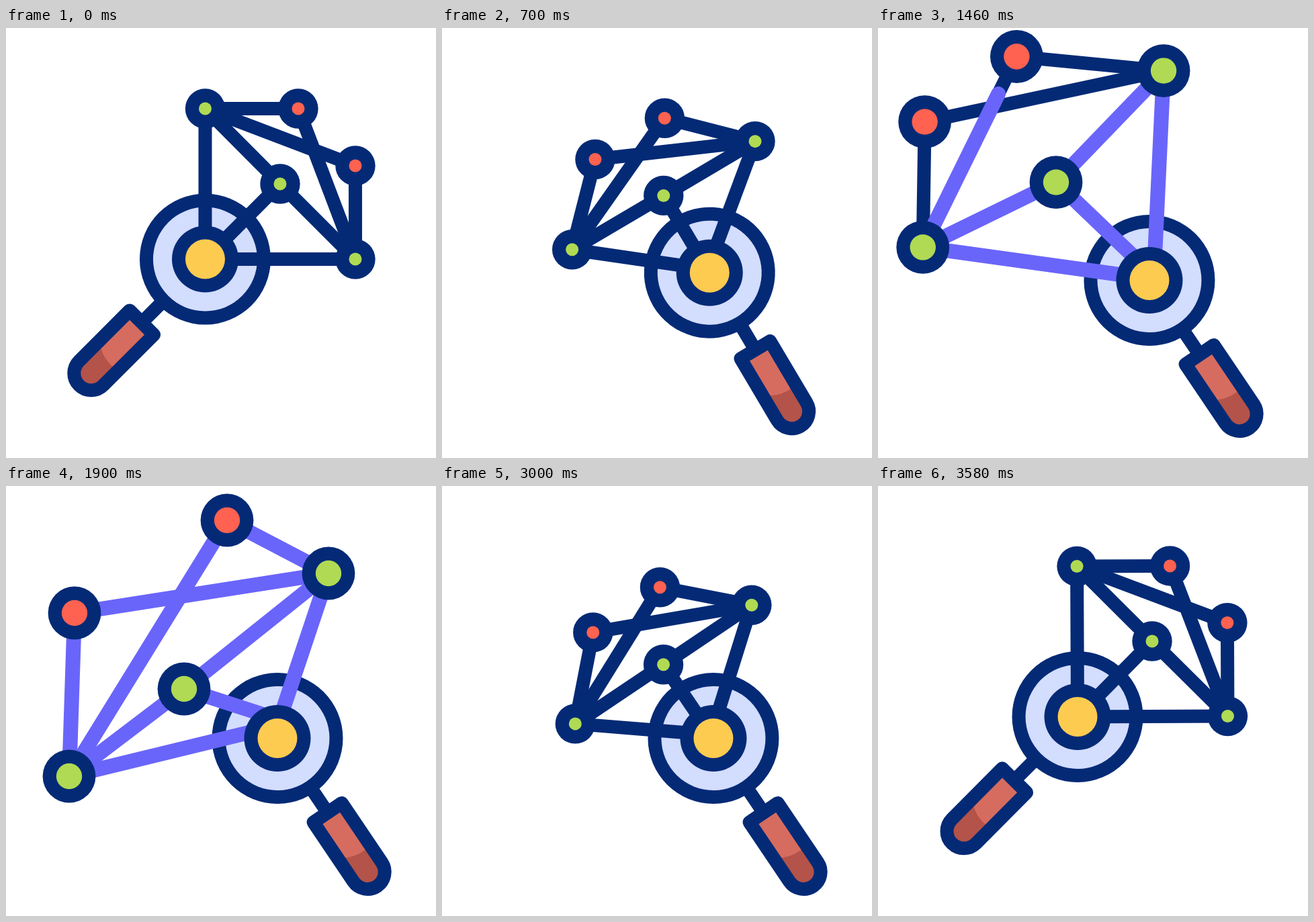
Write an HTML page with a canvas that moves like this. It is 640 by 640 pixels and loops after 3.6 s.

```html
<!DOCTYPE html>
<html lang="en">
<head>
<meta charset="utf-8">
<title>Network search</title>
<style>
  html, body { margin: 0; width: 100%; height: 100%; overflow: hidden; background: #fff; }
  canvas { display: block; }
</style>
</head>
<body>
<canvas id="stage" width="640" height="640"></canvas>
<script>
const ctx = document.getElementById('stage').getContext('2d');
const LOOP = 3600;
const NAVY = '#042a76', PURPLE = '#6a65fa', GREEN = '#b0da53', RED = '#ff6250';
const RAD = Math.PI / 180;
const POSE_TIMES = [800, 1320, 1900, 2500, 3000];
const SWEEP = 240, SWEEP_HOLD = 1100;
const SOCKET = 44; // distance from the lens centre where its links are fixed

// home: offset from the lens centre; poses: positions while spread out
const nodes = {
  a: { color: GREEN, home: [0, -224], poses: [[62, 308], [94, 432], [177, 442]] },
  b: { color: RED, home: [138.5, -224], poses: [[64, 131], [102, 189], [121, 244]], lead: 130 },
  m: { color: GREEN, home: [111.5, -112], poses: [[265, 217], [265, 302], [308.5, 220.5]] },
  d: { color: RED, home: [223.5, -139], poses: [[185, 41], [329, 51], [158.5, 40.4]] },
  e: { color: GREEN, home: [223.5, 0], poses: [[415.5, 52], [480, 130], [528, 82]] }
};

// [from, to, time the highlight sets off]; c is the lens
const links = [
  ['c', 'm', 800], ['c', 'e', 937], ['c', 'a', 1040], ['a', 'm', 1040], ['e', 'm', 1180],
  ['a', 'd', 1268], ['a', 'b', 1445], ['e', 'd', 1460], ['e', 'b', 1490]
];

const clamp = x => Math.min(1, Math.max(0, x));
const smooth = x => x * x * (3 - 2 * x);
const mix = (a, b, k) => a + (b - a) * k;
const mixPoint = (p, q, k) => [mix(p[0], q[0], k), mix(p[1], q[1], k)];

// Offset [x, y] turned by angle and added to the origin
const place = ([ox, oy], [x, y], angle) => [
  ox + x * Math.cos(angle) - y * Math.sin(angle),
  oy + x * Math.sin(angle) + y * Math.cos(angle)
];

function track(times, values, t) {
  let i = 0;
  while (i < times.length - 2 && t >= times[i + 1]) i++;
  const k = smooth(clamp((t - times[i]) / (times[i + 1] - times[i])));
  return Array.isArray(values[i]) ? mixPoint(values[i], values[i + 1], k) : mix(values[i], values[i + 1], k);
}

function disc([x, y], r, color) {
  ctx.beginPath();
  ctx.arc(x, y, r, 0, 7);
  ctx.fillStyle = color;
  ctx.fill();
}

function line(p, q, width, color, cap = 'butt') {
  ctx.beginPath();
  ctx.moveTo(...p);
  ctx.lineTo(...q);
  ctx.lineWidth = width;
  ctx.lineCap = cap;
  ctx.strokeStyle = color;
  ctx.stroke();
}

// Drawn with the lens at the origin and the handle pointing down
function magnifier(center, angle) {
  ctx.save();
  ctx.translate(...center);
  ctx.rotate(angle);
  line([0, 90], [0, 135], 20, NAVY);
  disc([0, 0], 97.5, NAVY);
  disc([0, 0], 77.5, '#d3ddfe');

  const grip = new Path2D('M-25.5 133.5H25.5V240A25.5 25.5 0 0 1-25.5 240Z');
  ctx.fillStyle = '#d66c5f';
  ctx.fill(grip);
  ctx.fillStyle = '#b35349';
  ctx.fill(new Path2D('M-20 201Q-2 213 20 210V240A20 20 0 0 1-20 240Z'));
  ctx.lineWidth = 20;
  ctx.lineJoin = 'round';
  ctx.strokeStyle = NAVY;
  ctx.stroke(grip);
  ctx.restore();
}

function draw(t) {
  ctx.clearRect(0, 0, 640, 640);

  // The whole glass swings about the tip of its handle
  const swing = track([0, 800, 3000, 3600], [0, 1, 1, 0], t);
  const turn = -79 * swing * RAD;
  const angle = 45 * RAD + turn;
  const tip = mixPoint([101.3, 539.2], [558.3, 604.3], swing);
  const center = place(tip, [0, -276], angle);
  const hub = place(center, [0, 25.5 * swing], angle);

  const points = {}, sockets = {};
  for (const [key, { home, poses }] of Object.entries(nodes)) {
    const rest = place(hub, home, turn);
    const reach = SOCKET / Math.hypot(...home);
    points[key] = track(POSE_TIMES, [rest, ...poses, rest], t);
    sockets[key] = place(center, home.map(v => v * reach), turn);
  }
  const ends = (from, to) => [from === 'c' ? sockets[to] : points[from], points[to]];

  magnifier(center, angle);
  for (const [from, to] of links) line(...ends(from, to), 20, NAVY);
  for (const [from, to, start] of links) {
    const head = clamp((t - start) / SWEEP);
    const tail = clamp((t - start - SWEEP_HOLD) / SWEEP);
    if (head > tail) {
      const [p, q] = ends(from, to);
      line(mixPoint(p, q, tail), mixPoint(p, q, head), 22, PURPLE, 'round');
    }
  }

  disc(center, 49.5, NAVY);
  disc(center, 29.5, '#fdcb50');
  for (const [key, { color, lead = 0 }] of Object.entries(nodes)) {
    const times = [860 - lead, 1030 - lead, 1300 - lead, 2600, 2700, 2960];
    const grow = track(times, [0, -2.9, 9.7, 9.7, 11, 0], t);
    disc(points[key], 29.7 + grow, NAVY);
    disc(points[key], 9.5 + grow, color);
  }
}

function tick() {
  draw(performance.now() % LOOP);
  requestAnimationFrame(tick);
}
tick();
</script>
</body>
</html>
```
